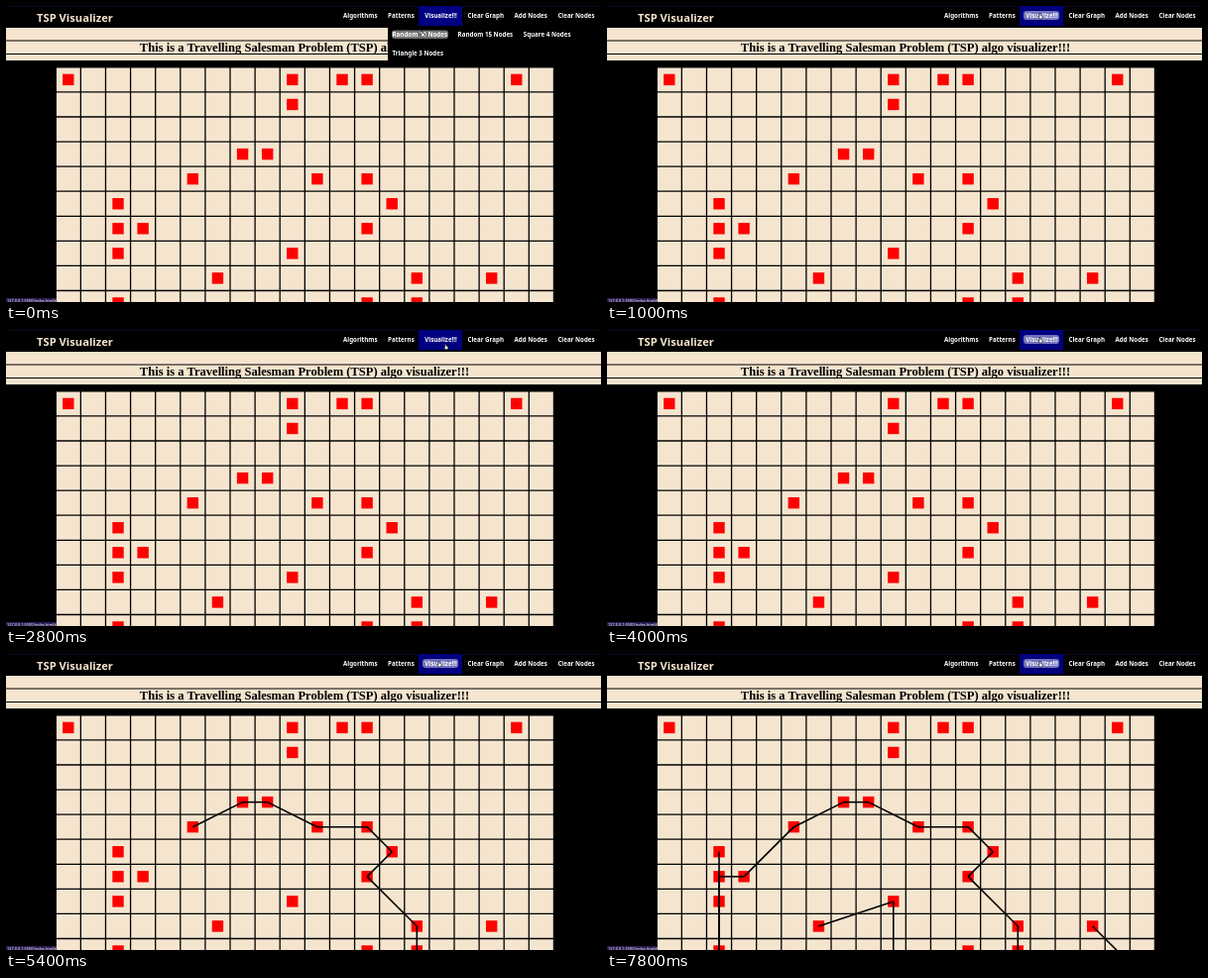
Write an HTML page with a canvas that moves like this. It is 600x299 px and loops after 8000 ms.

```html
<!DOCTYPE html>
<html lang="en">
<head>
<meta charset="utf-8">
<title>TSP Visualizer</title>
<style>
html, body { margin: 0; width: 100%; height: 100%; overflow: hidden; background: #000; }
canvas { display: block; }
</style>
</head>
<body>
<canvas id="stage" width="600" height="299"></canvas>
<script>
const ctx = document.getElementById('stage').getContext('2d');
const LOOP = 8000, STEP = 200, EDGE_GAP = 150;
const BEIGE = '#f5e5cf', SANS = '"Noto Sans", sans-serif';
const colX = c => 62.8 + c * 25.11;
const rowY = r => 74.4 + r * 25.07;

// Columns holding a node, row by row; the last row lies below the stage
const nodes = [[0, 9, 11, 12, 18], [9], [], [7, 8], [5, 10, 12], [2, 13],
  [2, 3, 12], [2, 9], [6, 14, 17], [2, 12, 14], [9, 19]]
  .flatMap((cols, r) => cols.map(c => ({ c, r })));

// Each walk hops to the nearest free node; the lower one wins a tie
const walks = [
  { c: 5, r: 4, start: 4150, hops: 9 },
  { c: 5, r: 4, start: 5500, hops: 5 },
  { c: 9, r: 10, start: 6700, hops: 2 },
  { c: 19, r: 10, start: 7750, hops: 1 }
];

function planEdges() {
  const used = new Set(), edges = [];
  const find = ({ c, r }) => nodes.find(n => n.c === c && n.r === r);
  for (const walk of walks) {
    let from = find(walk);
    used.add(from);
    for (let i = 0; i < walk.hops; i++) {
      const dist = n => (n.c - from.c) ** 2 + (n.r - from.r) ** 2;
      const to = nodes.filter(n => !used.has(n))
        .sort((a, b) => dist(a) - dist(b) || b.r - a.r)[0];
      used.add(to);
      edges.push({ from, to, at: walk.start + i * EDGE_GAP });
      from = to;
    }
  }
  return edges;
}
const edges = planEdges();

// Pointer rests: time, x, y
const stops = [[0, 420, 28], [500, 437, 11], [1000, 437, 10], [1400, 362, 14],
  [1800, 424, 28], [2200, 456, 29], [3200, 437, 10], [LOOP, 437, 10]];

function pointerAt(t) {
  const i = stops.findIndex(s => s[0] > t);
  const [t0, x0, y0] = stops[i - 1], [t1, x1, y1] = stops[i];
  const p = (t - t0) / (t1 - t0), ease = p * p * (3 - 2 * p);
  return [x0 + (x1 - x0) * ease, y0 + (y1 - y0) * ease];
}

function rect(color, x, y, w, h) {
  ctx.fillStyle = color;
  ctx.fillRect(x, y, w, h);
}

function text(str, x, y, font, color = '#fff') {
  ctx.font = font;
  ctx.fillStyle = color;
  ctx.fillText(str, x, y);
}

// Labels in a row with even gaps
function labels(names, x, y) {
  for (const name of names) {
    text(name, x, y, '600 6.2px ' + SANS);
    x += ctx.measureText(name).width + 10.6;
  }
}

function line(x1, y1, x2, y2, width) {
  ctx.lineWidth = width;
  ctx.beginPath();
  ctx.moveTo(x1, y1);
  ctx.lineTo(x2, y2);
  ctx.stroke();
}

function highlight(x, y, w, h) {
  ctx.fillStyle = 'rgba(255,255,255,.45)';
  ctx.beginPath();
  ctx.roundRect(x, y, w, h, 3);
  ctx.fill();
}

function drawGrid() {
  ctx.strokeStyle = '#000';
  const left = colX(-.5), right = colX(19.5), top = rowY(-.5);
  rect(BEIGE, left, top, right - left, 299 - top);
  for (let c = 0; c <= 20; c++) line(colX(c - .5), top, colX(c - .5), 299, 1.3);
  for (let r = 0; r <= 9; r++) line(left, rowY(r - .5), right, rowY(r - .5), 1.3);
  for (const { c, r } of nodes) rect('#f00', colX(c) - 5.7, rowY(r) - 5.7, 11.4, 11.4);
}

function drawHeader() {
  rect(BEIGE, 0, 22, 600, 33);
  line(0, 35, 600, 35, 1.2);
  line(0, 48.5, 600, 48.5, 1.2);
  ctx.textAlign = 'center';
  text('This is a Travelling Salesman Problem (TSP) algo visualizer!!!', 301, 46,
    'bold 12.54px "Liberation Serif", serif', '#000');
  ctx.textAlign = 'left';
  rect('#0e0724', 0, 0, 600, 1);
  text('TSP Visualizer', 31, 16, '600 11.2px ' + SANS, BEIGE);
  rect('#000080', 416, 0, 44, 20);
}

function drawMenus(t) {
  labels(['Algorithms', 'Patterns', 'Visualize!!!', 'Clear Graph', 'Add Nodes', 'Clear Nodes'], 340, 12);
  if (t < 200) {
    rect('#000', 385, 20, 215, 35);
    labels(['Random 10 Nodes', 'Random 15 Nodes', 'Square 4 Nodes'], 389.5, 31);
    labels(['Triangle 3 Nodes'], 389.5, 50);
    highlight(389, 24.5, 57, 8.5);
  } else if (t >= 1400 && t < 2800) {
    rect('#000', 340, 20, 222, 18);
    labels(['Greedy', 'NI Heurestic', 'Minimum Spanning Tree', 'Two Opt + NI'], 345, 31);
  }
}

const hand = new Path2D('M-1-2.5H0L.3-.7 2.2 0 2 2 1.4 3H-.8L-2.3.5-1 .8Z');

function drawPointer(x, y) {
  ctx.save();
  ctx.translate(x, y);
  ctx.fillStyle = '#fff';
  ctx.lineWidth = .6;
  ctx.fill(hand);
  ctx.stroke(hand);
  ctx.restore();
}

function draw(t) {
  const [x, y] = pointerAt(t);
  rect('#000', 0, 0, 600, 299);
  drawGrid();
  drawHeader();
  for (const { from, to, at } of edges)
    if (t >= at) line(colX(from.c), rowY(from.r), colX(to.c), rowY(to.r), 1.6);
  if (x > 420 && x < 456 && y < 16) highlight(420, 5, 36, 9);
  drawMenus(t);
  rect('#2a1a55', 0, 295, 51, 4);
  text('127.0.0.1:5500/index.html#', 1, 298.5, '3.9px ' + SANS);
  drawPointer(x, y);
}

function tick(now) {
  draw(Math.floor(now % LOOP / STEP) * STEP);
  requestAnimationFrame(tick);
}
requestAnimationFrame(tick);
</script>
</body>
</html>
```
